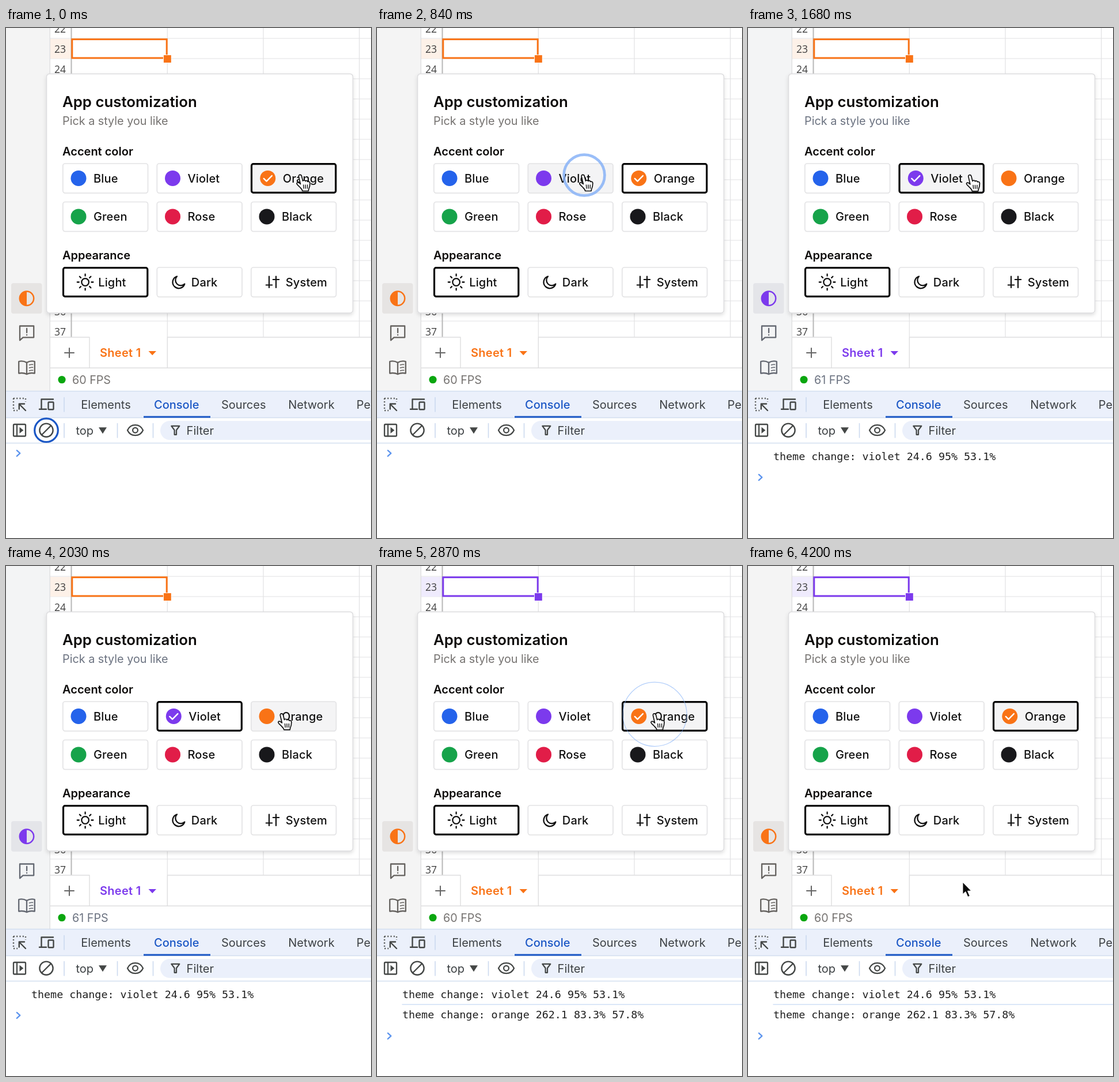
Animation, 634 px wide and 884 px high, one loop 4.27 s. Source, as an HTML page:

```html
<!DOCTYPE html>
<html lang="en">
<head>
<meta charset="utf-8">
<title>Theme switcher</title>
<style>
  html, body { margin: 0; width: 100%; height: 100%; overflow: hidden; background: #fff; }
  svg { display: block; width: 634px; height: 884px; }
  text { font: 400 20px Inter, sans-serif; font-optical-sizing: none; white-space: pre; }
  .title { font-size: 25.8px; font-weight: 600; fill: #0c0a09; }
  .label { font-weight: 600; fill: #0c0a09; }
  .option { font-weight: 500; fill: #111; letter-spacing: .15px; }
  .row { font: 17.5px "Open Sans", "Noto Sans", sans-serif; fill: #3f3f3f; text-anchor: middle; }
  .tool { fill: #3c4043; }
  .log { font: 18.33px "DejaVu Sans Mono", monospace; fill: #1f1f1f; }
  .line { fill: none; stroke-linecap: round; stroke-linejoin: round; }
  .accent { fill: var(--accent); }
  .muted { fill: var(--muted); }
  .side { stroke: var(--icon); stroke-width: 2.3; }
</style>
</head>
<body>
<svg id="stage" viewBox="0 0 634 884" xmlns="http://www.w3.org/2000/svg"></svg>
<script>
const LOOP = 4270, STEP = 70;
const ORANGE = '#f97316', VIOLET = '#7c3aed';
const THEMES = {
  orange: { accent: ORANGE, muted: '#757270', icon: '#65625f', side: '#f4f4f4', active: '#e6e4e3' },
  violet: { accent: VIOLET, muted: '#6b7280', icon: '#646872', side: '#f3f4f5', active: '#e4e5e9' }
};

// Timeline in ms
const FIRST_CLICK = 709, SECOND_CLICK = 2493;
const BLUR = 770, TO_VIOLET = 910, TO_ORANGE = 2694;

const COLS = [98, 261.5, 425];
const BTN = { w: 149.3, h: 52.6 };
const colors = [
  ['Blue', '#2563eb'], ['Violet', VIOLET], ['Orange', ORANGE],
  ['Green', '#16a34a'], ['Rose', '#e11d48'], ['Black', '#18181b']
].map(([name, fill], i) => ({ name, fill, x: COLS[i % 3], y: i < 3 ? 234.2 : 300.7 }));

const rect = (x, y, w, h, fill, more = '') =>
  `<rect x="${x}" y="${y}" width="${w}" height="${h}" fill="${fill}" ${more}/>`;
const path = (d, stroke, width = 2, more = '') =>
  `<path class="line" d="${d}" stroke="${stroke}" stroke-width="${width}" ${more}/>`;
const text = (x, y, cls, s, more = '') =>
  `<text x="${x}" y="${y}" class="${cls}" ${more}>${s}</text>`;

// A bordered button; the black frame marks the chosen one
const frame = (x, y, chosen, fill) => chosen
  ? rect(x + 1.5, y + 1.5, BTN.w - 3, BTN.h - 3, fill, 'rx="3" stroke="#050505" stroke-width="3.2"')
  : rect(x + .8, y + 2.4, BTN.w - 1.6, BTN.h - 1.6, '#00000009', 'rx="4"') +
    rect(x + .8, y + .8, BTN.w - 1.6, BTN.h - 1.6, fill, 'rx="4" stroke="#e3e3e5" stroke-width="1.7"');

function sheet() {
  let s = '';
  for (let y = 18; y < 530; y += 35) s += path(`M76 ${y}H634`, '#e2e2e3', 1.2);
  for (const x of [280.3, 447, 613.7]) s += path(`M${x} 0V536`, '#e2e2e3', 1.2);
  s += rect(77, 19, 36, 34, 'var(--head)');
  s += path('M113.5 0V536', '#b8b8b8', 2);
  [[22, 8], [23, 43], [24, 78], [36, 498], [37, 533]].forEach(([n, y]) => s += text(94, y, 'row', n));
  s += rect(114.8, 19.6, 164.4, 32.4, 'none', 'stroke="var(--sel)" stroke-width="3"');
  s += rect(273, 46.2, 14.4, 14.4, '#fff') + rect(273.9, 47.1, 12.9, 12.9, 'var(--sel)');
  s += rect(76, 536, 558, 93, '#fff');
  s += path('M76 536H145V589M280.3 589V536H634M76 589.3H634', '#dededf', 1.4);
  s += path('M102 563H118M110 555V571', '#666', 2.1);
  s += text(163, 570.3, 'accent', 'Sheet 1', 'style="font-weight:600;letter-spacing:.3px"');
  s += '<path class="accent" d="M247.5 560H261L254.2 567.3Z"/>';
  s += '<circle cx="97" cy="609.5" r="6.6" fill="#0aa60f"/>';
  return s + text(115, 616.6, 'muted', '60 FPS', 'id="fps" style="font-size:19.7px"');
}

function sidebar() {
  const page = 'C32 577.6 26.5 577 22.2 578V598.5C27 597.6 32 598 36 600';
  return rect(0, 0, 76, 629, 'var(--side)') + path('M76.3 0V629', '#dededf', 1.3) +
    rect(9, 442.3, 53.5, 52.8, 'var(--active)', 'rx="4"') +
    '<circle cx="36" cy="468.7" r="12.2" fill="none" stroke="var(--accent)" stroke-width="2.5"/>' +
    '<path class="accent" d="M36 456.5A12.2 12.2 0 0 0 36 480.9Z"/>' +
    '<g class="line side"><path d="M24 516.5H48.2V536.3H29.5L24 541.3Z"/>' +
    '<path d="M36.1 521V528M36.1 531.8V532.2"/>' +
    `<path d="M36 580${page}V580"/><path d="M36 580${page}" transform="matrix(-1 0 0 1 72 0)"/>` +
    '<path d="M40.5 584Q43.5 583 46.5 583.3M40.5 589Q43.5 588 46.5 588.3M40.5 594Q43.5 593 46.5 593.3" stroke-width="1.7"/></g>';
}

function card() {
  let s = rect(70.5, 79.5, 532, 414.5, '#fff', 'rx="5" stroke="#dcdcde" stroke-width="1.5" filter="url(#shadow)"');
  s += text(98, 136.6, 'title', 'App customization');
  s += text(98, 167.6, 'muted', 'Pick a style you like', 'style="font-size:19.8px"');
  s += text(98, 221, 'label', 'Accent color') + text(98, 401.2, 'label', 'Appearance');
  s += '<g id="options"></g>';
  COLS.forEach((x, i) => s += frame(x, 414.2, i === 0, '#fff'));
  let rays = '';
  for (let i = 0; i < 8; i++) {
    const a = i * Math.PI / 4, c = Math.cos(a), n = Math.sin(a);
    rays += `M${137.6 + 10.8 * c} ${440.5 + 10.8 * n}L${137.6 + 13.8 * c} ${440.5 + 13.8 * n}`;
  }
  s += '<circle cx="137.6" cy="440.5" r="6.3" fill="none" stroke="#111" stroke-width="2.3"/>';
  s += path(rays, '#111', 2.3);
  s += path('M297 430.5A10.6 10.6 0 1 0 310.3 443.6A8.8 8.8 0 0 1 297 430.5Z', '#111', 2.3);
  s += path('M457 430.5V450M451.8 445.5H462.2M469 430.5V450M463.8 436H474.2', '#111', 2.2);
  [['Light', 160.2], ['Dark', 321.8], ['System', 485.8]].forEach(([n, x]) => s += text(x, 447.8, 'option', n));
  return s;
}

function devtools() {
  const ink = '#444746', blue = '#1b57c5';
  let s = rect(0, 629, 634, 255, '#fff') + rect(0, 629, 634, 46.5, '#ebf0fb');
  s += path('M0 629.5H634M0 675.5H634M0 719.5H634', '#d2deef', 1.5);
  s += path('M101 640.5V665M101 685.5V710M193.5 685.5V710M255.5 685.5V710', '#cbd9ef', 1.6);
  s += rect(239, 672.6, 116, 3, blue);
  [['Elements', 130.3], ['Sources', 374], ['Network', 490.3], ['Performance', 608.8]]
    .forEach(([n, x]) => s += text(x, 659.6, 'tool', n));
  s += text(257, 659.6, 'tool', 'Console', `style="fill:${blue};font-weight:500"`);
  // Inspect and device icons
  s += path('M13 642H34V648M13 642V663H20', ink, 2.4, 'stroke-dasharray="1.8 3.5" style="stroke-linecap:butt"');
  s += path('M23 652L34 663M22.8 660.5V651.5H32', ink, 2.4);
  s += path('M82 643.5H61.5V660M58 660.8H70', ink, 2.4);
  s += rect(73.5, 648.5, 9, 12.8, 'none', `rx="1" stroke="${ink}" stroke-width="2.4"`);
  // Console toolbar
  s += rect(13, 687, 21, 20.5, 'none', `rx="1.5" stroke="${ink}" stroke-width="2.3"`);
  s += path('M19 687V707.5', ink, 2.2) + `<path d="M23.5 691.8L30.3 697.2L23.5 702.7Z" fill="${ink}"/>`;
  s += `<circle cx="70" cy="697.2" r="11.6" fill="none" stroke="${ink}" stroke-width="2.4"/>`;
  s += path('M62 705.3L78.2 689.1', ink, 2.3);
  s += `<circle id="focus" cx="70" cy="697.2" r="20.3" fill="none" stroke="${blue}" stroke-width="3.2"/>`;
  s += text(121.5, 704.6, 'tool', 'top') + `<path d="M161 692.3H175L168 703.2Z" fill="${ink}"/>`;
  s += path('M211 697.2C216.5 685.2 232.5 685.2 238 697.2C232.5 709.2 216.5 709.2 211 697.2Z', ink, 2.3);
  s += `<circle cx="224.5" cy="697.2" r="4.4" fill="none" stroke="${ink}" stroke-width="2.3"/>`;
  s += rect(268, 681, 400, 33, '#ebf0fb', 'rx="16.5"');
  s += path('M287.3 689.8H301.3L296 697V704.8H292.6V697Z', ink, 2.2) + text(313.6, 704.6, 'tool', 'Filter');
  s += '<g id="log1">' + text(44, 748.8, 'log', 'theme change: violet 24.6 95% 53.1%') + '</g>';
  s += '<g id="log2">' + path('M44 760H634', '#cfdff6', 1.6) +
    text(44, 784, 'log', 'theme change: orange 262.1 83.3% 57.8%') + '</g>';
  return s + path('M18.8 -5L24.3 0L18.8 5', '#5c94ee', 2.3, 'id="prompt"');
}

const pointers =
  '<g id="hand" stroke="#111" stroke-width="1.7" stroke-linejoin="round" stroke-linecap="round">' +
  '<path fill="#fff" d="M-2.6 1.8C-3-1.7 1.6-2.2 2.5 1.2L4.6 9.6C5.3 7.8 8.4 7.8 9 10C10 8.4 12.6 9 13 11C14.6 10 17 11 17 13.6' +
  'L16.5 18.5C16.2 21.3 14.5 22.5 14.3 27H4C3.5 24 1 22 -1 20C-3 17.8 -6.3 15.8 -6 13.6C-5.4 11.4 -2 12 .5 15Z"/>' +
  '<path fill="none" stroke-width="1.4" d="M5.6 16.5L6.2 22.5M9 16.5L9.3 22.5M12.5 16.5V22.5"/></g>' +
  '<path id="arrow" d="M0 0V23L5.2 18.2L9 27L13.2 25.2L9.4 16.6H16.3Z" fill="#0a0a0a" stroke="#fff" stroke-width="1.7" stroke-linejoin="round"/>';

const stage = document.getElementById('stage');
stage.innerHTML =
  '<defs><filter id="shadow" x="-10%" y="-10%" width="120%" height="120%">' +
  '<feDropShadow dx="0" dy="3" stdDeviation="3" flood-color="#000" flood-opacity=".13"/></filter></defs>' +
  rect(0, 0, 634, 884, '#fff') + sheet() + sidebar() + card() + devtools() +
  '<circle id="ripple" fill="none" stroke="#84b0f7"/>' + pointers;

const $ = id => document.getElementById(id);
const clamp = v => Math.min(1, Math.max(0, v));
const show = (id, on) => $(id).setAttribute('visibility', on ? 'visible' : 'hidden');

const moves = [
  { from: 0, to: 560, a: [511, 255.5], b: [357.8, 255.5], ease: p => (1 - Math.cos(Math.PI * p)) / 2 },
  { from: 1610, to: 2100, a: [357.8, 255.5], b: [482, 257], ease: p => Math.sin(p * Math.PI / 2) },
  { from: 4060, to: 4200, a: [482, 257], b: [372.6, 547], ease: p => p ** 3.4 }
];

function pointerAt(t) {
  const m = moves.filter(m => t >= m.from).pop() || moves[0];
  const p = m.ease(clamp((t - m.from) / (m.to - m.from)));
  return m.a.map((v, i) => v + (m.b[i] - v) * p);
}

const optionAt = ([x, y]) =>
  colors.find(c => x >= c.x && x <= c.x + BTN.w && y >= c.y && y <= c.y + BTN.h);

function drawOptions(chosen, hovered) {
  $('options').innerHTML = colors.map(c => {
    const on = c.name === chosen, shift = on ? 1.75 : 0;
    const cx = c.x + 28 + shift, cy = c.y + 26.2;
    return frame(c.x, c.y, on, c === hovered ? '#f4f4f5' : '#fff') +
      `<circle cx="${cx}" cy="${cy}" r="13.5" fill="${c.fill}"/>` +
      (on ? path(`M${cx - 7} ${cy + .5}l4.8 4.8l9.3 -9.6`, '#fff', 2.4) : '') +
      text(c.x + 54 + shift, c.y + 33.5, 'option', c.name);
  }).join('');
}

function drawRipple(t) {
  const second = t >= SECOND_CLICK;
  const age = t - (second ? SECOND_CLICK : FIRST_CLICK);
  const on = age > 0 && age < 550;
  show('ripple', on);
  if (!on) return;
  const set = (k, v) => $('ripple').setAttribute(k, v);
  set('cx', second ? 482.5 : 360);
  set('cy', second ? 257 : 255);
  set('r', 70 - 55 * Math.exp(-age / 282));
  set('stroke-width', Math.max(1.2, 7 - age * .0175));
  set('opacity', clamp(age / 160) * (1 - clamp((age - 270) / 280)));
}

function draw(t) {
  const violet = t >= TO_VIOLET && t < TO_ORANGE;
  const done = t >= TO_ORANGE;
  const theme = THEMES[violet ? 'violet' : 'orange'];
  for (const k in theme) stage.style.setProperty('--' + k, theme[k]);
  // The grid selection lags one theme behind
  stage.style.setProperty('--sel', done ? VIOLET : ORANGE);
  stage.style.setProperty('--head', done ? '#efebfd' : '#fdf1e8');

  const pos = pointerAt(t);
  drawOptions(violet ? 'Violet' : 'Orange', optionAt(pointerAt(Math.max(0, t - STEP))));
  drawRipple(t);

  const hand = !!optionAt(pos);
  show('hand', hand);
  show('arrow', !hand);
  $(hand ? 'hand' : 'arrow').setAttribute('transform', `translate(${pos})`);

  show('focus', t < BLUR);
  show('log1', t >= TO_VIOLET);
  show('log2', done);
  $('prompt').setAttribute('transform', `translate(0 ${done ? 814.7 : violet ? 778.9 : 737.2})`);
  const fps = t < TO_VIOLET || t >= 2240 ? 60 : t < 1330 ? 58 : 61;
  $('fps').textContent = fps + ' FPS';
}

const start = performance.now();
let last = -1;
function tick() {
  const t = Math.floor(((performance.now() - start) % LOOP) / STEP) * STEP;
  if (t !== last) draw(last = t);
  requestAnimationFrame(tick);
}
tick();
</script>
</body>
</html>
```
